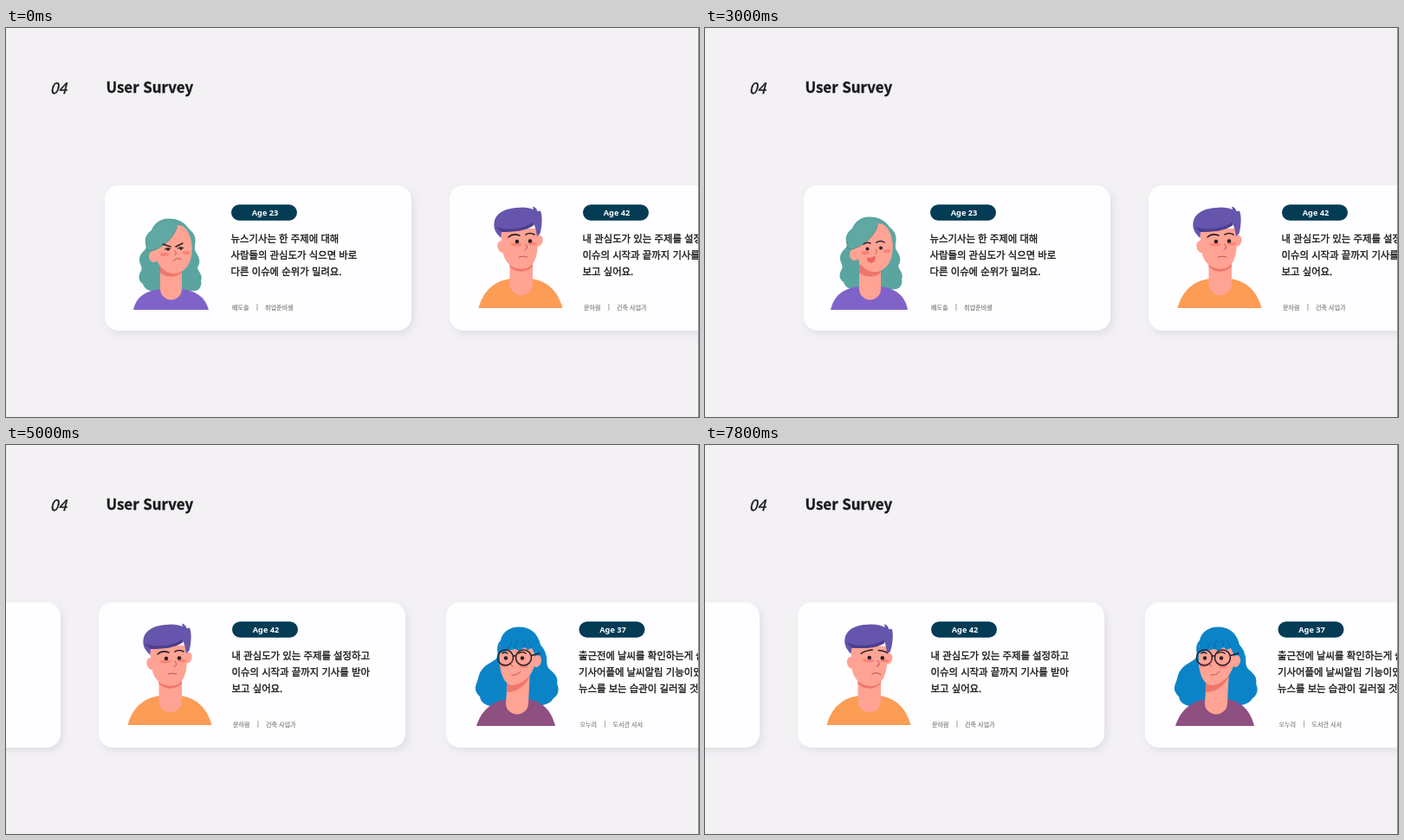
Write an HTML page that moves like this. It is 800x450 px and loops after 8 s.

```html
<!DOCTYPE html>
<html lang="ko">
<head>
<meta charset="utf-8">
<title>User Survey</title>
<style>
  html, body { margin: 0; width: 100%; height: 100%; overflow: hidden; background: #f3f1f4; }
  svg { display: block; width: 100vw; height: 100vh; }
  text { font-family: "Noto Sans CJK KR", "Noto Sans CJK JP", "Noto Sans CJK", sans-serif; fill: #1c1a1d; stroke: #1c1a1d; stroke-width: .35; }
  .title { font-size: 16.9px; font-weight: 700; }
  .number { font-size: 17.5px; font-style: italic; }
  .quote { font-size: 11.4px; font-weight: 500; }
  .meta { font-size: 7.1px; font-weight: 500; fill: #858286; stroke: #858286; stroke-width: .2; }
  .age { font: 700 9.2px "Noto Sans", "Open Sans", sans-serif; fill: #fff; stroke: none; text-anchor: middle; }
  .card { fill: #fefdff; filter: drop-shadow(3px 4px 4px rgba(60, 50, 70, .09)); }
  .skin { fill: #ffa394; }
  .shade { fill: #f0766c; }
  .blush { fill: #f5776d; opacity: .75; }
  .ink { fill: #29202a; }
  .line { fill: none; stroke: #29202a; stroke-width: 1.5; stroke-linecap: round; stroke-linejoin: round; }
  .thin { fill: none; stroke: #c65350; stroke-width: 1; stroke-linecap: round; }
  .teal { fill: #5aa5a0; }
  .purple { fill: #6655ac; }
  .blue { fill: #0b84c7; }
</style>
</head>
<body>
<svg viewBox="0 0 800 450">
  <text class="number" x="50.8" y="75.6">04</text>
  <text class="title" x="115.5" y="75.4">User Survey</text>

  <g id="strip">
    <g id="cards"></g>

    <g id="womanTeal">
      <g class="tealHead">
        <path class="teal" d="M187 220.500C178 220.500 171 226 168 234C161 239 159 246 162 252C163 257 154 259 154 268C154 274 158 276 156 281C152 287 153 293 158 296C160 303 168 306 175 304H214C222 306 227 299 225 292C228 287 222 282 221 277C226 270 222 264 219 259C216 254 220 248 218 242C217 237 214 235 210 231C205 223 195 220 187 220.500Z"/>
      </g>
      <path id="tealBody" fill="#8063c8"/>
      <g id="tealNeck">
        <path class="skin" d="M178 270V302a12.500 12.500 0 0 0 25 0V270Z"/>
        <path class="shade" d="M178 274V283C185 289 197 289 203 283V274Z"/>
      </g>
      <g class="tealHead">
        <ellipse class="skin" cx="170.500" cy="264" rx="5.500" ry="7"/>
        <path class="skin" d="M172 252C180 246 192 238 197 228C206 227 213 236 214.500 250C216 268 210 281 197 284C184 286 175 275 172 262Z"/>
        <path d="M190 221.500C178 223 167 232 162 248C161 254 163 258 167 258C180 255 193 244 198 228Z" fill="#60a8a3"/>
        <path d="M162 249C162 256 163 258 167 258C180 255 193 244 197.500 230" fill="none" stroke="#468b89" stroke-width=".9"/>
        <ellipse class="blush" cx="183" cy="262" rx="5" ry="2"/>
        <ellipse class="blush" cx="208" cy="260" rx="4.500" ry="2"/>
        <path class="thin" d="M195 258q3 3 0 5"/>
        <g id="frown">
          <path class="line" d="M181 250L190 253M196 253L204 249"/>
          <path class="line" style="stroke-width:1.100" d="M183.500 256q3-2 6-.5M198.500 255q3-2 6-.5"/>
          <circle class="ink" cx="187" cy="256.300" r="1.500"/><circle class="ink" cx="202" cy="255.300" r="1.500"/>
          <path class="thin" d="M193 269.500q4-4.500 9-2"/>
        </g>
        <g id="smile">
          <path class="line" d="M181 252q4-3 8-1M196 250q5-3 9 0"/>
          <circle class="ink" cx="185.500" cy="257.500" r="2"/><circle class="ink" cx="201" cy="256.500" r="2"/>
          <path fill="#ef665f" d="M184.500 268q5 0 10-2.500q1 7-4 8t-6-5.500Z"/>
        </g>
      </g>
    </g>

    <g id="man" transform="translate(405)">
      <path fill="#fc9c55" d="M140.500 324C146 303 160 292 178 290H202C220 293 232 304 237.500 324Z"/>
      <path class="skin" d="M176.500 266V296a13.250 13.250 0 0 0 26.500 0V266Z"/>
      <path class="shade" d="M176.500 268V276C184 284 196 283 203 276V268Z"/>
      <g id="manHead">
        <ellipse class="skin" cx="167.500" cy="253" rx="5" ry="7" transform="rotate(-15 167.500 253)"/>
        <ellipse class="skin" cx="210" cy="246" rx="4.500" ry="6.500" transform="rotate(12 210 246)"/>
        <path class="skin" d="M166 232H207C209 244 210 258 206 267C203 276 196 280 187 278.500C175 277 169 267 168 256Z"/>
        <path class="purple" d="M158.500 226C159 216 169 209 184 208C193 206.500 199 208 204 210L203 206.500Q207.500 207.500 208.500 212L212 211.500C214.500 217 214 230 211.500 238L208 241C207 234 206 230 204 226C194 233 180 234 167 235L166.500 243C161 238 157.500 232 158.500 226Z"/>
        <path d="M160 230C175 235 194 232 204 224.500L204.500 228C196 235 180 236 167 236Z" fill="#4c3e8e"/>
        <g id="manFace">
          <ellipse class="blush" cx="184" cy="250.500" rx="6.500" ry="1.800"/>
          <ellipse class="blush" cx="203" cy="249.500" rx="5" ry="1.800"/>
          <circle class="ink" cx="185" cy="247" r="2.300"/><circle class="ink" cx="200" cy="246.500" r="2.300"/>
          <path class="thin" d="M195 250q4 5-1 6.500"/>
          <path class="line" id="manBrows"/>
          <path class="thin" id="manMouth"/>
        </g>
      </g>
    </g>

    <g id="womanBlue" transform="translate(405)">
      <path class="blue" d="M593 210.500C582 210 573 216 571 226C566 231 567 238 568 243C567 250 557 251 551 258C545 264 546 270 543 276C540 284 544 288 547 291C548 299 557 304 566 301H612C620 302 629 299 632 293C638 289 639 282 636 276C638 269 633 264 628 260C622 255 626 248 623 242C622 237 620 235 617 231C614 217 604 210.500 593 210.500Z"/>
      <path fill="#8e4f81" d="M543 325C548 309 559 297 578 294H603C621 297 630 309 634 325Z"/>
      <path class="skin" d="M579 268L577 299a13 12.500 0 0 0 26 0L605 260Z"/>
      <path class="shade" d="M579 272L578 286C589 286 600 279 605 267Z"/>
      <ellipse class="skin" cx="613" cy="250" rx="5" ry="7" transform="rotate(15 613 250)"/>
      <path class="skin" d="M570 232H609L611 252C608 267 597 277 584 278C576 277 571 266 570 254Z"/>
      <path class="blue" d="M570 241C569 225 579 215 594 216C608 217 616 229 614 244L610 241L607 235L602 237L599 234L592 238L588 236L579 238Z"/>
      <path d="M579 237Q581 231 584 228M588 235Q588 230 591 226M599 233L597 226M607 234L603 226" fill="none" stroke="#086ba9" stroke-width="1"/>
      <ellipse class="blush" cx="575" cy="255" rx="4" ry="2"/>
      <ellipse class="blush" cx="598" cy="256" rx="5" ry="2"/>
      <path class="line" d="M573 241q3-2 6 0M592 241q4-3 8 0"/>
      <circle class="ink" cx="577" cy="246.500" r="2.200"/><circle class="ink" cx="596" cy="246.500" r="2.200"/>
      <g class="line">
        <circle cx="576.500" cy="246" r="9"/><circle cx="597.500" cy="246" r="9"/>
        <path d="M585.500 244.500q1.500-1.500 3 0M606.500 243.500L616 241"/>
      </g>
      <path class="thin" d="M585 249q-4 6 0 7M584 266q6 1 10-4"/>
    </g>
  </g>

  <rect x="799" width="1" height="450" fill="#8c8a8e"/>
</svg>
<script>
const LOOP = 8000, STEP = 200, SCROLL = 405;
const $ = id => document.getElementById(id);

const people = [
  { x: 114, textX: 260, age: 23, name: "배도솔", job: "취업준비생",
    lines: ["뉴스기사는 한 주제에 대해", "사람들의 관심도가 식으면 바로", "다른 이슈에 순위가 밀려요."] },
  { x: 512, textX: 666, age: 42, name: "문하람", job: "건축 사업가",
    lines: ["내 관심도가 있는 주제를 설정하고", "이슈의 시작과 끝까지 기사를 받아", "보고 싶어요."] },
  { x: 913, textX: 1066.5, age: 37, name: "오누리", job: "도서관 사서",
    lines: ["출근전에 날씨를 확인하는게 습관", "기사어플에 날씨알림 기능이있어", "뉴스를 보는 습관이 길러질 것"] }
];

const label = (cls, x, y, text) => `<text class="${cls}" x="${x}" y="${y}">${text}</text>`;

$("cards").innerHTML = people.map(({ x, textX, age, name, job, lines }) => `
  <rect class="card" x="${x}" y="182" width="354" height="168" rx="16"/>
  <rect x="${textX}" y="204.3" width="76" height="18.500" rx="9.250" fill="#043c55"/>
  ${label("age", textX + 39, 217, "Age " + age)}
  ${lines.map((line, i) => label("quote", textX - .5, 247.8 + 19.3 * i, line)).join("")}
  ${label("meta", textX + 1, 325.6, name)}
  ${label("meta", textX + 29, 325.2, "|")}
  ${label("meta", textX + 39, 325.6, job)}`).join("");

const clamp = v => Math.max(0, Math.min(1, v));
const ease = (t, from, to) => {
  const p = clamp((t - from) / (to - from));
  return p < .5 ? 4 * p ** 3 : 1 - 4 * (1 - p) ** 3;
};
const move = (node, x, y, angle = 0, pivotX = 0, pivotY = 0) =>
  node.setAttribute("transform", `translate(${x} ${y}) rotate(${angle} ${pivotX} ${pivotY})`);
const tealHeads = document.querySelectorAll(".tealHead");

function drawWomanTeal(t) {
  const phase = t % 3600;
  const lean = ease(phase, 0, 600) - ease(phase, 1400, 2400);
  const happy = phase >= 2400 && phase < 3400;
  for (const head of tealHeads) {
    move(head, happy ? 2 : -7 * lean, happy ? -2 : lean, -2 * lean, 190, 285);
  }
  move($("tealNeck"), happy ? 0 : -1.5 * lean, 0);
  $("tealBody").setAttribute("d", happy
    ? "M145 326C149 309 160 301 178 299H203C219 301 231 309 234 326Z"
    : "M147 326C150 311 161 304 178 302H203C219 304 230 311 234 326Z");
  $("smile").style.display = happy ? "" : "none";
  $("frown").style.display = happy ? "none" : "";
}

function drawMan(t) {
  const sad = ease(t, 6100, 6700);
  const sway = ease(t, 200, 1000) - ease(t, 1500, 2400);
  move($("manHead"), 0, 0, 3.2 * sad + 1.7 * sway, 190, 278);
  move($("manFace"), 3 * sad, -sad);
  $("manBrows").setAttribute("d",
    `M175 ${242 + sad}Q180 ${237 + 2 * sad} 188 ${240 - 2 * sad}M195 ${239 - sad}Q200 ${236 + 2 * sad} 205 ${239 + sad}`);
  $("manMouth").setAttribute("d", `M${187 + 2 * sad} ${265 + sad}q5 ${-2 - 2 * sad} 10 0`);
}

function draw(now) {
  const t = Math.floor(now % LOOP / STEP) * STEP;
  move($("strip"), -SCROLL * ease(t, 4080, 5000), 0);
  drawWomanTeal(t);
  drawMan(t);
}

const start = performance.now();
function frame() {
  draw(performance.now() - start);
  requestAnimationFrame(frame);
}
frame();
</script>
</body>
</html>
```
